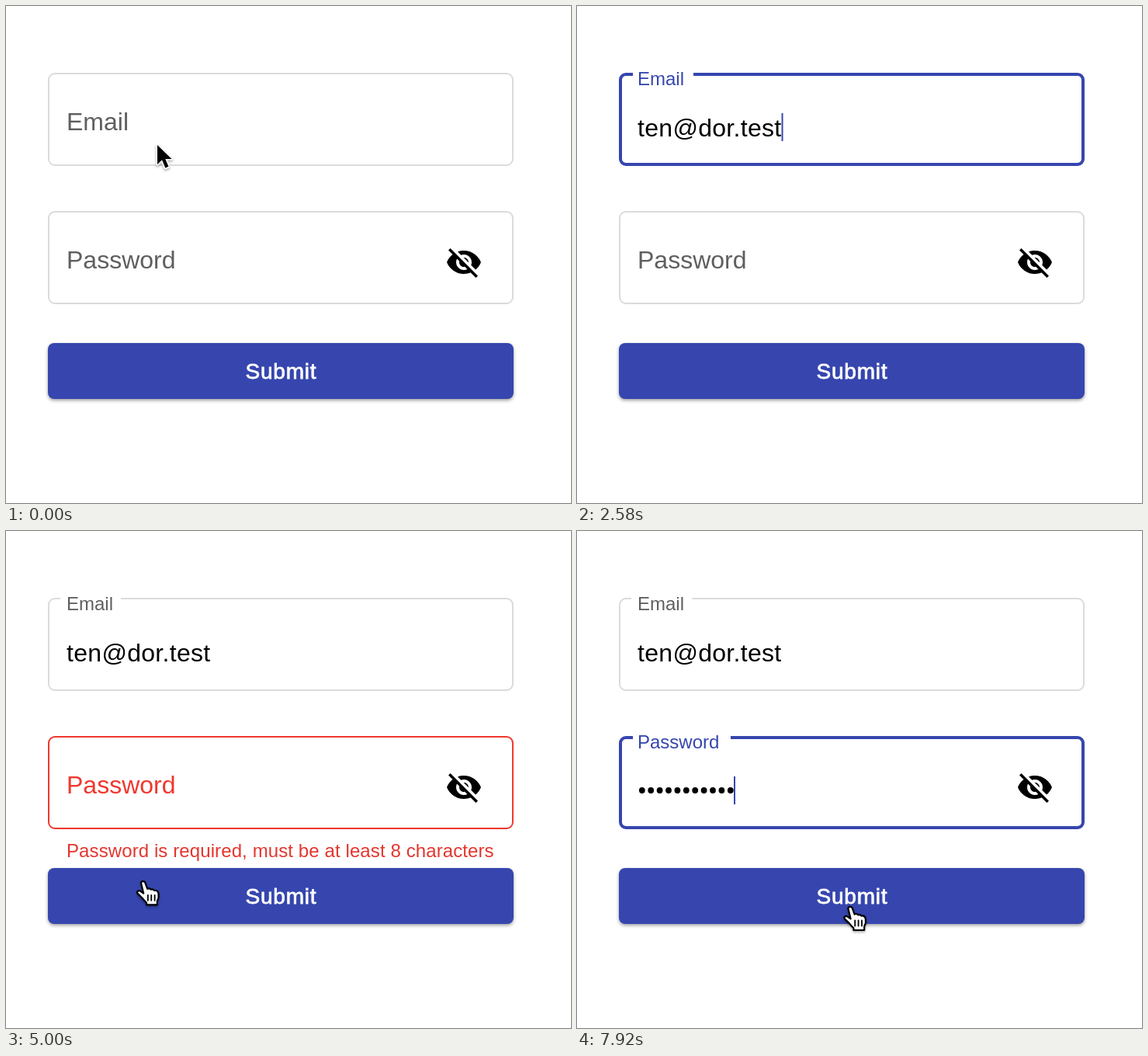
Write an HTML page that moves like this. It is 728 px wide and 640 px high and loops after 8 s.

```html
<!DOCTYPE html>
<html lang="en">
<head>
<meta charset="utf-8">
<title>Login form</title>
<style>
  html, body { margin: 0; width: 728px; height: 640px; overflow: hidden; background: #fff; }
  svg { display: block; font-family: "Liberation Sans", Arial, sans-serif; }
  .box { fill: #fff; }
  .value { font-size: 32px; letter-spacing: .3px; }
  .panel { fill: #fff; filter: drop-shadow(0 2px 4px rgba(0,0,0,.32)) drop-shadow(0 0 1px rgba(0,0,0,.25)); }
  .item { font: 500 25.4px Inter, sans-serif; fill: #202124; }
  .button { fill: #3646ae; filter: drop-shadow(0 2px 2px rgba(0,0,0,.38)); }
  .outline { paint-order: stroke; stroke: #fff; stroke-width: 3.4; stroke-linejoin: round; }
  #pointer { filter: drop-shadow(0 2px 1.5px rgba(0,0,0,.3)); }
</style>
</head>
<body>
<svg id="stage" width="728" height="640" viewBox="0 0 728 640">
  <g id="email"></g>
  <g id="password"></g>
  <g id="dots"></g>
  <path transform="translate(566 306) scale(2)" d="M12 7c2.76 0 5 2.24 5 5 0 .65-.13 1.26-.36 1.83l2.92 2.92c1.51-1.26 2.7-2.89 3.43-4.75-1.73-4.39-6-7.5-11-7.5-1.4 0-2.74.25-3.98.7l2.16 2.16C10.74 7.13 11.35 7 12 7zM2 4.27l2.28 2.28.46.46C3.08 8.3 1.78 10.02 1 12c1.73 4.39 6 7.5 11 7.5 1.55 0 3.03-.3 4.38-.84l.42.42L19.73 22 21 20.73 3.27 3 2 4.27zM7.53 9.8l1.55 1.55c-.05.21-.08.43-.08.65 0 1.66 1.34 3 3 3 .22 0 .44-.03.65-.08l1.55 1.55c-.67.33-1.41.53-2.2.53-2.76 0-5-2.24-5-5 0-.79.2-1.53.53-2.2zm4.31-.78l3.15 3.15.02-.16c0-1.66-1.34-3-3-3l-.17.01z"/>
  <text id="hint" x="78" y="420" font-size="24" letter-spacing=".1" fill="#e3362e">Password is required, must be at least 8 characters</text>
  <rect class="button" x="54" y="434" width="600" height="72" rx="8"/>
  <text x="354.4" y="480" font-size="28" letter-spacing=".8" text-anchor="middle" fill="#fff" stroke="#fff" stroke-width=".8">Submit</text>
  <g id="menu"></g>
  <g id="pointer">
    <path id="arrow" class="outline" d="M0 1V26L6 20.3L10.3 30.5L14.5 28.8L10.3 18.9H18.5Z"/>
    <g id="beam" fill="none" stroke-linecap="butt">
      <path id="beamEdge" stroke="#fff" stroke-width="5"/>
      <path id="beamLine" stroke="#000" stroke-width="2.2"/>
    </g>
    <g id="hand" stroke="#000" stroke-linejoin="round" stroke-linecap="round">
      <path fill="#fff" stroke-width="2.2" d="M-2.6 2.2C-2.6-.6 1.6-1 2.7 1.6L5.6 9.6Q8.2 8 10 10.4Q12.6 9.2 14.4 11.6Q18.6 10.8 19.8 15L20 20Q19.6 23 18.2 25V30H4.4V27.4Q1.5 24.5-1 21.4L-7 15.6C-8.8 13-5.6 10.8-3 12.8L.6 15.4Z"/>
      <path fill="none" stroke-width="1.8" d="M6.2 17.5V24.5M10.6 17.5V24.5M15 17.5V24.5"/>
    </g>
  </g>
</svg>
<script>
const NS = "http://www.w3.org/2000/svg";
const $ = id => document.getElementById(id);
const BLUE = "#3646ae", RED = "#ef382e", GRAY = "#dbdbdb", LABEL = "#5f5f5f";
const LOOP = 8000, FPS = 12;
const USER = "ten", ADDRESS = "ten@dor.test";
const MATCHES = [ADDRESS, USER, "ten@dor", "ten@lurbo.test"];
const SAVED = ["test", "example", ...MATCHES];

function add(parent, tag, attrs) {
  const el = document.createElementNS(NS, tag);
  set(el, attrs);
  return parent.appendChild(el);
}
function set(el, attrs) {
  for (const k in attrs) el.setAttribute(k, attrs[k]);
}
function show(el, on) {
  el.style.display = on ? "" : "none";
}

function makeField(id, y, name, gap) {
  const g = $(id);
  const f = { y, gap };
  f.box = add(g, "rect", { class: "box" });
  f.notch = add(g, "rect", { y: y - 1, height: 6, fill: "#fff" });
  f.label = add(g, "text", { x: 78 });
  f.label.textContent = name;
  f.value = add(g, "text", { class: "value", x: 78, y: y + 82 });
  f.caret = add(g, "rect", { y: y + 52, width: 2, height: 36 });
  return f;
}

// lift: 0 = label at rest, 1 = label on the border
function drawField(f, s) {
  const w = s.focus ? 4 : 2;
  const line = s.error ? RED : s.focus ? BLUE : GRAY;
  set(f.box, { x: 54 + w / 2, y: f.y + w / 2, width: 600 - w, height: 120 - w,
    rx: 9 - w / 2, stroke: line, "stroke-width": w });
  set(f.notch, { x: s.focus ? 72 : 70, width: f.gap });
  show(f.notch, s.lift > 0);
  set(f.label, { y: f.y + 74 - 58 * s.lift, "font-size": 32 - 8 * s.lift,
    fill: line === GRAY ? LABEL : line });
  f.value.textContent = s.text || "";
  set(f.caret, { x: s.caretX, fill: line });
  show(f.caret, s.focus && s.blink);
}

function makeMenu(names, width) {
  const g = add($("menu"), "g", {});
  add(g, "rect", { class: "panel", x: 78, y: 176, width, height: 32 + 72 * names.length, rx: 8 });
  g.mark = add(g, "rect", { x: 78, y: 193, width, height: 72, fill: "#e8e8e9" });
  names.forEach((name, i) => {
    add(g, "text", { class: "item", x: 102, y: 238 + 72 * i }).textContent = name;
  });
  return g;
}

const email = makeField("email", 86, "Email", 78);
const pass = makeField("password", 264, "Password", 126);
const fullMenu = makeMenu(SAVED, 615);
const shortMenu = makeMenu(MATCHES, 552);
const dots = Array.from({ length: 11 }, (_, i) =>
  add($("dots"), "circle", { cx: 83.8 + 11.4 * i, cy: 334, r: 3.9 }));

const beam = "M-6-14.5Q0-14.5 0-10V10.5Q0 15-6 15M6-14.5Q0-14.5 0-10V10.5Q0 15 6 15M-3.5 1H3.5";
set($("beamEdge"), { d: beam });
set($("beamLine"), { d: beam });

const emailKeys = [1000, 1250, 1330, 1410, 1910, 2250];
const emailText = ["", USER[0], USER.slice(0, 2), USER, ADDRESS, ADDRESS];
const passKeys = [...Array.from({ length: 8 }, (_, i) => 6330 + 105 * i), 7230, 7360, 7480];

const path = [
  [250, 195, 178], [830, 170, 158], [2670, 170, 158], [3420, 182, 538],
  [3580, 180, 562], [4000, 180, 562], [4580, 180, 476], [4830, 180, 476],
  [5500, 159, 322], [6150, 159, 322], [6420, 172, 490], [6670, 183, 603],
  [7050, 183, 603], [7170, 190, 580], [7830, 352, 484]
];

const clamp = x => Math.max(0, Math.min(1, x));
const between = (t, a, b) => t >= a && t < b;
const lift = (t, start) => 1 - Math.pow(1 - clamp((t - start) / 200), 1.78);
const blink = (t, last) => (t - last) % 1000 < 500;

function pointerAt(t) {
  const i = path.findIndex(p => p[0] > t);
  if (i < 0) return path[path.length - 1].slice(1);
  if (i === 0) return path[0].slice(1);
  const [a, b] = [path[i - 1], path[i]];
  const u = clamp((t - a[0]) / (b[0] - a[0]));
  const e = u * u * (3 - 2 * u);
  return [a[1] + (b[1] - a[1]) * e, a[2] + (b[2] - a[2]) * e];
}

function drawPointer(t) {
  const [x, y] = pointerAt(t);
  const hand = between(y, 434, 506);
  const text = between(y, 138, 176) || between(y, 316, 354);
  set($("pointer"), { transform: `translate(${x} ${y})` });
  show($("pointer"), !between(t, 1240, 2670));
  show($("hand"), hand);
  show($("beam"), text);
  show($("arrow"), !hand && !text);
}

function draw(t) {
  const key = emailKeys.filter(k => k <= t).length - 1;
  const text = emailText[key] || "";
  email.value.textContent = text;
  drawField(email, {
    focus: between(t, 995, 3570), lift: lift(t, 1000), text,
    caretX: 78 + (text ? email.value.getComputedTextLength() : 0),
    blink: blink(t, emailKeys[key] || 0)
  });

  const typed = passKeys.filter(k => k <= t).length;
  const error = between(t, 4900, passKeys[7]);
  drawField(pass, {
    focus: t >= 5660, error, lift: lift(t, 5700),
    caretX: typed ? 75.5 + 11.5 * typed : 78,
    blink: blink(t, typed ? passKeys[typed - 1] : 5660)
  });
  dots.forEach((d, i) => show(d, i < typed));
  show($("hint"), error);

  show(fullMenu, between(t, 1080, 1330));
  show(fullMenu.mark, false);
  show(shortMenu, between(t, 1330, 2250));
  show(shortMenu.mark, t >= 1910);
  drawPointer(t);
}

function tick(now) {
  const step = Math.min(LOOP * FPS / 1000 - 1, Math.floor((now % LOOP + 5) * FPS / 1000));
  draw(step * 1000 / FPS);
  requestAnimationFrame(tick);
}
draw(0);
requestAnimationFrame(tick);
</script>
</body>
</html>
```
